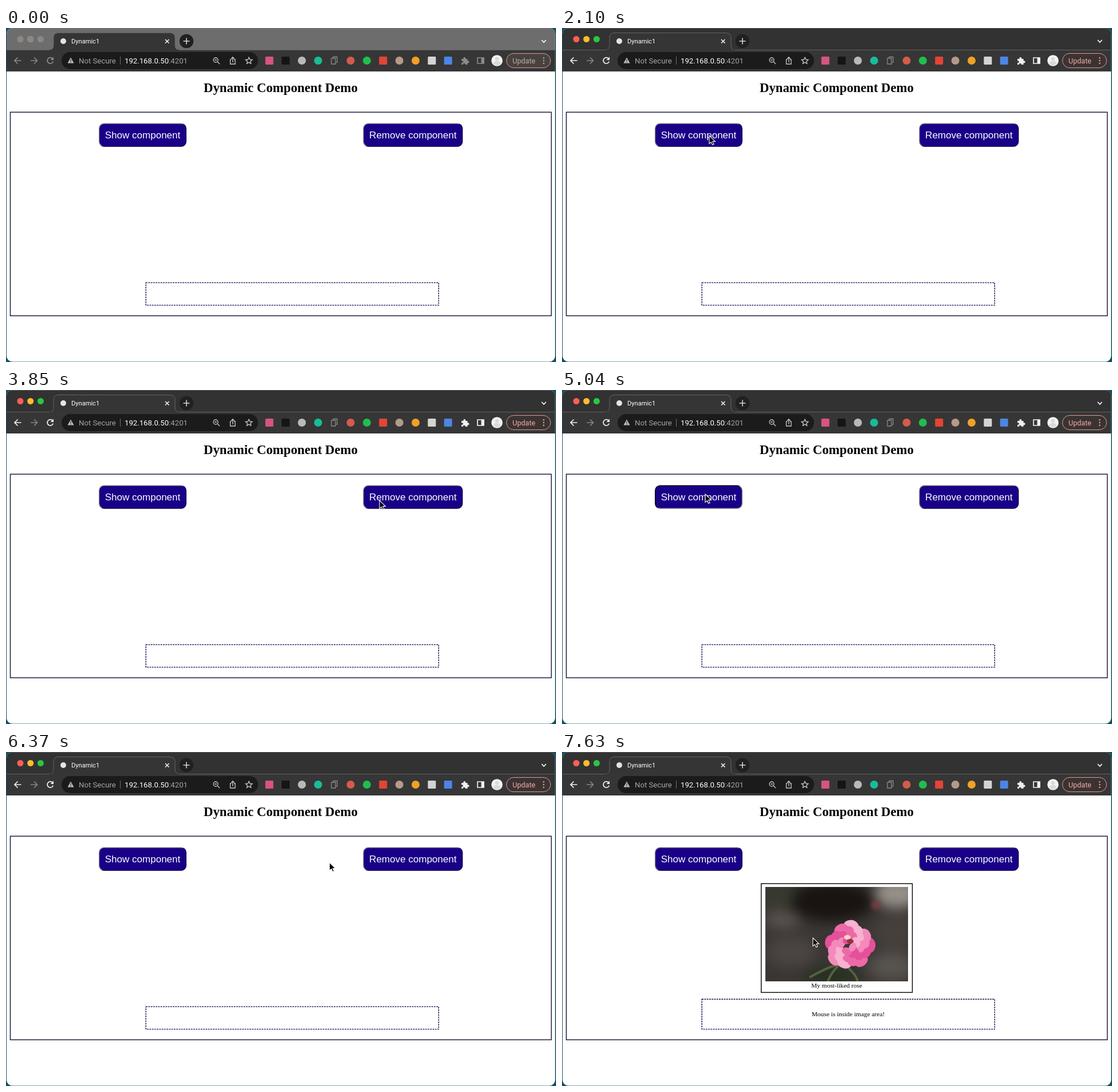
An HTML page for the animation above (8 s loop, 960 by 584 pixels).

```html
<!DOCTYPE html>
<html lang="en">
<head>
<meta charset="utf-8">
<title>Dynamic Component Demo</title>
<style>
  html, body { margin: 0; width: 100%; height: 100%; overflow: hidden; background: #14515f; }
  svg { display: block; width: 960px; height: 584px; }
  svg { --strip: #6d6d6d; --glyph: #8b8b8b; --update: #b8aeac; --pill: #48423f; --light: #888; }
  svg.active { --strip: #323232; --glyph: #f1f1f1; --update: #f2aaa2; --pill: #3b3332; --light: none; }
  text { font-family: "Liberation Serif", Times, serif; font-size: 11.36px; }
  .ui text { font-family: Roboto, Inter, sans-serif; font-size: 13.2px; }
  .button text { font: 17.04px "Liberation Sans", Arial, sans-serif; fill: #fff; }
  .mid { text-anchor: middle; }
  .line { fill: none; stroke: #c9c9c9; stroke-width: 1.3; }
  .glyph { fill: none; stroke: var(--glyph); stroke-width: 1.7; }
  .button rect { fill: #190087; stroke: url(#outset); stroke-width: 1.4; }
  .button.pressed rect { stroke: url(#inset); }
</style>
</head>
<body>
<svg id="stage" viewBox="0 0 960 584">
  <defs>
    <linearGradient id="outset" x2="1" y2="1">
      <stop offset=".5" stop-color="#77727f"/><stop offset=".5" stop-color="#100055"/>
    </linearGradient>
    <linearGradient id="inset" x2="1" y2="1">
      <stop offset=".5" stop-color="#050018"/><stop offset=".5" stop-color="#77727f"/>
    </linearGradient>
    <clipPath id="window"><rect x="1" y="0" width="957.5" height="583.5" rx="10"/></clipPath>
    <clipPath id="photoArea"><rect x="355" y="236" width="249" height="165"/></clipPath>
  </defs>

  <g clip-path="url(#window)">
    <rect width="960" height="584" fill="#fff"/>
    <g class="ui">
      <rect width="960" height="39" fill="var(--strip)"/>
      <path d="M0 .5H960" stroke="#777" opacity=".6"/>
      <rect y="38" width="960" height="38" fill="#363636"/>
      <path d="M0 38.5H75Q83 38.5 83 30V17Q83 8.5 92 8.5H286Q295 8.5 295 17V30Q295 38.5 303 38.5H960" fill="#353535" stroke="#646464"/>
      <path d="M76 39H302" stroke="#363636" stroke-width="2"/>
      <g id="lights"></g>

      <circle cx="100" cy="23" r="5" fill="#e4e4e4"/>
      <text x="114" y="27" fill="#fff" style="font-size:11.1px">Dynamic1</text>
      <path class="line" d="M278 20l6.5 6.5m0-6.5l-6.5 6.5" style="stroke:#f1f1f1;stroke-width:1.6"/>
      <circle cx="315" cy="23" r="12.2" fill="#202020"/>
      <path class="line" d="M309.5 23h11M315 17.5v11" style="stroke:#d5d5d5;stroke-width:1.6"/>
      <path class="line" d="M935 21l3.8 4 3.8-4" style="stroke:#fff;stroke-width:1.6"/>

      <path class="glyph" d="M26.5 57H15.500M20.500 51.500L15 57l5.500 5.500"/>
      <path class="glyph" d="M43 57h11M49 51.500L54.500 57 49 62.500" style="stroke:#858585"/>
      <path class="glyph" d="M81.200 53.400A5.200 5.200 0 1 0 82.300 58.500"/>
      <path d="M83 50.500v5.500h-5.500z" fill="var(--glyph)"/>

      <rect x="97" y="42" width="343" height="30" rx="15" fill="#1b1b1b"/>
      <path d="M113 51.500L118.500 61.500H107.500Z" fill="#bdbdbd"/>
      <path d="M113 54.800v3M113 58.800v1.400" stroke="#1b1b1b" stroke-width="1.200"/>
      <text x="127" y="61.500" fill="#a4a4a4">Not Secure</text>
      <path d="M199.500 50v14" stroke="#707070"/>
      <text x="207" y="61.500" fill="#fff">192.168.0.50<tspan fill="#a4a4a4">:4201</tspan></text>
      <circle class="line" cx="366" cy="56" r="4"/>
      <path class="line" d="M369 59l4 4M364 56h4"/>
      <path class="line" d="M393.500 55H391.500V63H400V55H398M395.800 60V51M393 53.800L395.800 51l2.800 2.800"/>
      <path class="line" d="M424 51.300l1.700 3.800 4.100.4-3.100 2.700.9 4-3.600-2.100-3.600 2.100.9-4-3.100-2.700 4.100-.4z"/>

      <g id="extensions"></g>
      <path class="line" d="M571 52V50.500H578V60H576M568 53H575V63H568Z" style="stroke:#8a8a8a"/>
      <path d="M795 54h3.500a2 2 0 1 1 3.500 0h3.500v3.500a2 2 0 1 1 0 3.500v3h-4a1.800 1.800 0 1 0-3.500 0h-3v-3.500a1.800 1.800 0 1 0 0-3z" fill="var(--glyph)"/>
      <path d="M823 52H834V62H823Z" class="glyph"/>
      <path d="M829.500 52H834V62H829.500Z" fill="var(--glyph)"/>
      <circle cx="857" cy="57" r="9.800" fill="#f2f2f2"/>
      <path d="M850.500 62.500a6.500 5 0 0 1 13 0a9 9 0 0 1-13 0z" fill="#dadada"/>
      <circle cx="857" cy="54" r="3.300" fill="#dadada"/>
      <rect x="873.500" y="44.500" width="77" height="25" rx="12.500" fill="var(--pill)" stroke="#dc9b94"/>
      <text x="884" y="61.500" fill="var(--update)" style="font-size:12.6px">Update</text>
      <path d="M938.500 52.200v10" stroke="var(--update)" stroke-width="2.400" stroke-linecap="round" stroke-dasharray="0 4.800"/>
    </g>

    <text class="mid" x="479.500" y="112" style="font-size:22.72px;font-weight:bold">Dynamic Component Demo</text>
    <rect x="7.500" y="147.200" width="944.300" height="356" fill="none" stroke="#100e33" stroke-width="1.400"/>
    <g class="button" id="show">
      <rect x="162.700" y="167.200" width="151.600" height="39.800" rx="8.500"/>
      <text class="mid" x="238.500" y="192.500">Show component</text>
    </g>
    <g class="button" id="remove">
      <rect x="624" y="167.200" width="172.600" height="39.800" rx="8.500"/>
      <text class="mid" x="710.300" y="192.500">Remove component</text>
    </g>

    <g id="card">
      <rect x="347.700" y="230.200" width="263.800" height="190.200" fill="#fff" stroke="#000" stroke-width="1.400"/>
      <g clip-path="url(#photoArea)">
        <rect x="355" y="236" width="249" height="165" fill="#3a3634"/>
        <g style="filter:blur(11px)">
          <ellipse cx="470" cy="262" rx="75" ry="34" fill="#191412"/>
          <ellipse cx="382" cy="250" rx="24" ry="25" fill="#373a2e"/>
          <ellipse cx="385" cy="293" rx="32" ry="15" fill="#5b5350"/>
          <ellipse cx="400" cy="350" rx="45" ry="28" fill="#4a4442"/>
          <ellipse cx="585" cy="247" rx="40" ry="26" fill="#969089"/>
          <ellipse cx="580" cy="315" rx="38" ry="32" fill="#45403c"/>
          <ellipse cx="575" cy="375" rx="42" ry="25" fill="#57534e"/>
          <ellipse cx="470" cy="392" rx="50" ry="14" fill="#25301f"/>
        </g>
        <ellipse cx="548" cy="268" rx="9" ry="8" fill="#8a3b48" opacity=".6" style="filter:blur(3px)"/>
        <path d="M480 372Q460 378 432 394M484 372Q470 385 464 401M500 378Q514 390 516 401" fill="none" stroke="#51633f" stroke-width="4"/>
        <g id="rose"></g>
      </g>
      <text class="mid" x="479.500" y="411.500">My most-liked rose</text>
    </g>

    <rect id="status" x="244.200" width="511" fill="none" stroke="#0b0a50" stroke-width="1.400" stroke-dasharray="2.84 1.42"/>
    <text id="message" class="mid" x="499.500" y="461.500">Mouse is inside image area!</text>

    <g id="pointer">
      <g id="ring" fill="none">
        <circle r="19" stroke="#000" stroke-width="3"/>
        <circle r="19" stroke="#fff" stroke-width="1.500"/>
      </g>
      <path d="M0 0V14.300L3.300 11.300 5.500 16.300 8 15.200 5.800 10.400H10.400Z" stroke="#fff" stroke-width="1.100"/>
    </g>
  </g>
</svg>

<script>
const $ = id => document.getElementById(id);
const LOOP = 8000, TICK = 70, ACTIVATED = 1260;

// start, end, x, y
const moves = [
  [0, 560, 249, 240],
  [630, 840, 256, 172],
  [910, 1120, 256, 186],
  [2030, 2100, 257, 188],
  [2100, 2170, 257, 191],
  [2800, 3150, 618, 188],
  [3150, 3500, 652, 193],
  [3920, 4480, 260, 187],
  [4550, 4760, 250, 182],
  [5110, 5460, 618, 188],
  [5460, 5810, 651, 194],
  [6160, 6860, 251, 190],
  [7280, 7630, 438, 325],
];
// button, press, ring end, release
const clicks = [
  [null, ACTIVATED, 1540, 1540],
  ['show', 2310, 2520, 2590],
  ['remove', 3570, 3710, 3780],
  ['show', 4900, 5040, 5110],
  ['remove', 5880, 6090, 6160],
  ['show', 6930, 7070, 7140],
];

$('lights').innerHTML = ['#fe5f57', '#febc2e', '#28c840'].map((color, i) =>
  `<circle cx="${25 + 17.7 * i}" cy="19.500" r="5.500" fill="${color}"/>
   <circle cx="${25 + 17.7 * i}" cy="19.500" r="5.500" fill="var(--light)"/>`).join('');

const badges = ['s#d75482', 's#151515', 'c#b9b9b9', 'c#18bd98', '', 'c#d55b4c', 'c#22bd50',
  's#e34435', 'c#b69a88', 'c#f0a126', 's#d4d4d4', 's#4c85e5'];
$('extensions').innerHTML = badges.map((badge, i) => {
  const x = 459.7 + 28.36 * i, color = badge.slice(1);
  if (!badge) return '';
  return badge[0] === 'c'
    ? `<circle cx="${x}" cy="57" r="7" fill="${color}"/>`
    : `<rect x="${x - 7}" y="50" width="14" height="14" rx="1.500" fill="${color}"/>`;
}).join('');

const petals = ['#e5509a', '#f38abb', '#f8b1d0', '#ec69a7'];
$('rose').innerHTML = Array.from({ length: 30 }, (_, i) => {
  const angle = i * 137.5, radius = 36 * Math.sqrt(1 - i / 30), size = 7 + radius / 6;
  return `<ellipse transform="translate(501.500 338) rotate(${angle}) translate(${radius})"
    rx="${size * .75}" ry="${size}" fill="${petals[i % 4]}"/>`;
}).join('') + '<ellipse cx="498" cy="324" rx="6" ry="4" fill="#f3d3c1"/><ellipse cx="503" cy="331" rx="6" ry="4" fill="#963041"/>';

function pointerAt(time) {
  let x = 183, y = 560;
  for (const [start, end, toX, toY] of moves) {
    if (time < start) break;
    const p = Math.min(1, (time - start) / (end - start));
    const eased = p * p * (3 - 2 * p);
    x += (toX - x) * eased;
    y += (toY - y) * eased;
  }
  return [x, y];
}

const setVisible = (id, visible) => $(id).style.display = visible ? '' : 'none';

function draw(time) {
  const [x, y] = pointerAt(time);
  const click = clicks.find(([, press, , release]) => time >= press && time < release);
  const last = clicks.filter(([button, , , release]) => button && time >= release).pop();
  const shown = last?.[0] === 'show';
  const inside = shown && x > 355 && x < 604 && y > 236 && y < 401;

  $('stage').classList.toggle('active', time >= ACTIVATED);
  for (const id of ['show', 'remove']) $(id).classList.toggle('pressed', click?.[0] === id);
  setVisible('card', shown);
  setVisible('message', inside);
  const top = inside ? 432.2 : 445.4;
  $('status').setAttribute('y', top);
  $('status').setAttribute('height', 484.6 - top);
  setVisible('pointer', time > 0);
  setVisible('ring', click && time < click[2]);
  $('pointer').setAttribute('transform', `translate(${x} ${y})`);
}

function frame() {
  const time = performance.now() % LOOP;
  draw(Math.floor(time / TICK) * TICK);
  requestAnimationFrame(frame);
}
frame();
</script>
</body>
</html>
```
